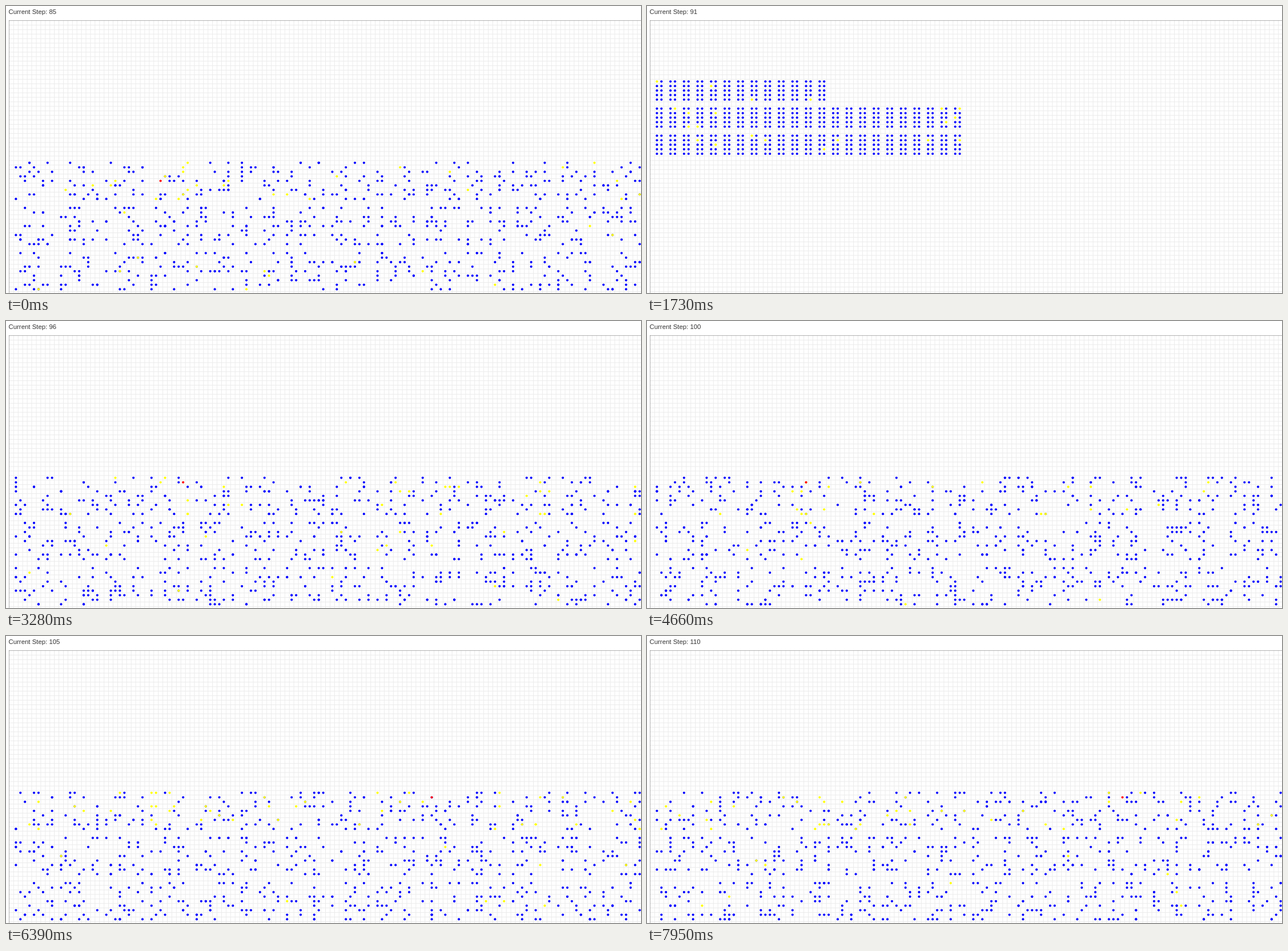
An HTML page with a canvas that plays this animation: 1112x503 px, repeating every 8 s.

```html
<!DOCTYPE html>
<html lang="en">
<head>
<meta charset="utf-8">
<title>Step simulation</title>
<style>
  html, body { margin: 0; width: 100%; height: 100%; overflow: hidden; background: #fff; }
  #stage { position: relative; width: 1112px; height: 503px; overflow: hidden; }
  canvas { position: absolute; left: 0; top: 0; }
  #label {
    position: absolute; left: 4.5px; top: -0.5px;
    font: 11.4px/20px "Liberation Sans", Arial, sans-serif;
    color: #333; white-space: pre;
  }
</style>
</head>
<body>
<div id="stage">
  <canvas id="view" width="1112" height="503"></canvas>
  <div id="label"></div>
</div>
<script>
const W = 1112, H = 503, LOOP = 8000;
const LEFT = 5.5, TOP = 25.5, CELL = 7.915, RADIUS = 2.1;
const SLOT = 173, SLOT_SHIFT = 19;
const FIRST_STEP = 85;
const HOME_ROW = 13, WORK_ROW = 31;
const BLOCKS = 14, BANDS = 3, BLOCK_AGENTS = 20, CLINIC = 3;
const BLUE = '#0000ff', YELLOW = '#ffff00', RED = '#ff0000';

// One letter per slot: w = next step at work, h = same step at home, . = hold
const rhythm = 'ww.w.wwww.' + 'hw'.repeat(5) + '.w.w.w' + 'hwhw' + '.w.w' + 'hw'.repeat(5) + 'w.w';

let step = FIRST_STEP - 1, scene;
const slots = [...rhythm].map(mark => {
  if (mark === 'w') step++;
  if (mark !== '.') scene = { step, home: mark === 'h' };
  return scene;
});

const ctx = document.getElementById('view').getContext('2d');
const label = document.getElementById('label');

function seeded(seed) {
  let a = seed * 7919;
  return () => {
    a = (a + 0x6D2B79F5) | 0;
    let t = Math.imul(a ^ (a >>> 15), a | 1);
    t ^= t + Math.imul(t ^ (t >>> 7), t | 61);
    return ((t ^ (t >>> 14)) >>> 0) / 4294967296;
  };
}

function dots(cells, color, firstRow) {
  ctx.fillStyle = color;
  for (const [col, row] of cells) {
    ctx.beginPath();
    ctx.arc(LEFT + (col + 1.5) * CELL, TOP + (row + firstRow + 0.5) * CELL, RADIUS, 0, 7);
    ctx.fill();
  }
}

function line(x1, y1, x2, y2) {
  ctx.beginPath();
  ctx.moveTo(x1, y1);
  ctx.lineTo(x2, y2);
  ctx.stroke();
}

function drawGrid() {
  ctx.fillStyle = '#fff';
  ctx.fillRect(0, 0, W, H);
  ctx.lineWidth = 1;
  ctx.strokeStyle = '#ebebeb';
  for (let x = LEFT + CELL; x < W; x += CELL) line(x, TOP, x, H);
  for (let y = TOP + CELL; y < H; y += CELL) line(LEFT, y, W, y);
  ctx.strokeStyle = '#666';
  ctx.setLineDash([1, 1]);
  line(LEFT, TOP, LEFT, H);
  line(LEFT, TOP, W, TOP);
  ctx.setLineDash([]);
}

// Three rows of houses, each two agents wide and five high
const homes = [];
[13, 23, 23].forEach((count, band) => {
  for (let i = 0; i < count * 10; i++) {
    homes.push([Math.floor(i / 10) * 3 + i % 2, band * 6 + Math.floor(i % 10 / 2)]);
  }
});

// Random order in which agents fall ill
const homeRnd = seeded(5);
for (let i = homes.length - 1; i > 0; i--) {
  const k = Math.floor(homeRnd() * (i + 1));
  [homes[i], homes[k]] = [homes[k], homes[i]];
}

function drawHomes(step) {
  const ill = 9 + 2 * (step - FIRST_STEP);
  dots(homes.slice(ill), BLUE, HOME_ROW);
  dots(homes.slice(0, ill), YELLOW, HOME_ROW);
}

function sickShare(block, band, step) {
  if (band > 0) return 0.016;
  return block === CLINIC ? 0.45 : 0.055 + (step - FIRST_STEP) * 0.0028;
}

// Every workplace is a 9 by 9 block where agents take random cells
function drawWork(step) {
  const rnd = seeded(step);
  const pick = (block, band) =>
    [block * 10 + Math.floor(rnd() * 9), band * 10 + Math.floor(rnd() * 9)];
  const well = [], sick = [];
  for (let band = 0; band < BANDS; band++) {
    for (let block = 0; block < BLOCKS; block++) {
      for (let i = 0; i < BLOCK_AGENTS; i++) {
        const ill = rnd() < sickShare(block, band, step);
        (ill ? sick : well).push(pick(block, band));
      }
    }
  }
  const redBlock = step < 105 ? CLINIC : step < 109 ? 9 : 10;
  dots(well, BLUE, WORK_ROW);
  dots(sick, YELLOW, WORK_ROW);
  dots([pick(redBlock, 0)], RED, WORK_ROW);
}

let shown = null;
function frame() {
  const t = performance.now() % LOOP;
  const slot = Math.min(Math.floor((t + SLOT_SHIFT) / SLOT), slots.length - 1);
  if (slots[slot] !== shown) {
    shown = slots[slot];
    label.textContent = 'Current Step: ' + shown.step;
    drawGrid();
    (shown.home ? drawHomes : drawWork)(shown.step);
  }
  requestAnimationFrame(frame);
}
frame();
</script>
</body>
</html>
```
